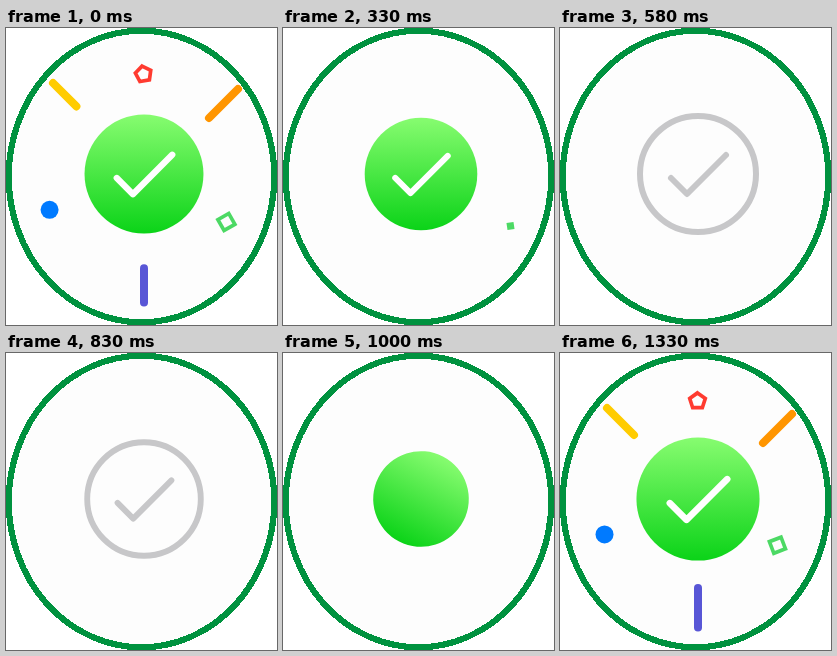
An HTML page that plays this animation: 271 px wide and 297 px high, repeating every 1.37 s.

```html
<!DOCTYPE html>
<html lang="en">
<head>
<meta charset="utf-8">
<title>Check burst</title>
<style>
  html, body { margin: 0; width: 100%; height: 100%; overflow: hidden; background: #fff; }
  svg { display: block; width: 100vw; height: 100vh; }
  .line { fill: none; stroke-linecap: round; stroke-linejoin: round; }
  .ray { stroke-width: 8; }
  .shape { fill: none; stroke-width: 3.7; }
</style>
</head>
<body>
<svg viewBox="0 0 271 297">
  <defs>
    <linearGradient id="fresh" x1="0" y1="0" x2="0" y2="1">
      <stop offset="0" stop-color="#87fc70"/>
      <stop offset="1" stop-color="#0bd318"/>
    </linearGradient>
  </defs>
  <ellipse cx="135.5" cy="148.5" rx="132.8" ry="145.8" fill="#fdfdfd" stroke="#00923f" stroke-width="6.2" shape-rendering="crispEdges"/>

  <g id="burst">
    <line id="yellow" class="line ray" stroke="#ffcc00"/>
    <line id="orange" class="line ray" stroke="#ff9500"/>
    <line id="purple" class="line ray" stroke="#5856d6"/>
    <circle id="dot" fill="#007aff"/>
    <polygon id="pentagon" class="shape" stroke="#ff3b30"/>
    <polygon id="square" class="shape" stroke="#4cd964"/>
  </g>

  <g id="idle" class="line" stroke="#c7c7c9" stroke-width="6">
    <circle r="58"/>
    <path d="M-27 4L-11 20L28-19"/>
  </g>

  <g id="done">
    <circle id="disc" r="59" fill="url(#fresh)"/>
    <path id="tick" class="line" d="M-27 4L-11 20L28-19" stroke="#fff" stroke-width="6.3" pathLength="100"/>
  </g>
</svg>
<script>
  const LOOP = 1370, FPS = 24, STEPS = 33;
  const PRESS = 18;   // step at which the press begins; k counts from it
  const RESET = 29;   // hard cut back to the idle state
  const BURST = 8;    // confetti comes out from behind the disc

  // Tips are where the rays end; "from" and "length" are distances back from the tip.
  const rays = [
    { id: "yellow", tip: [47, 55], back: [1, 1], from: 48, length: 27, enter: 7, leave: 14, power: 2.8 },
    { id: "orange", tip: [232, 61], back: [-1, 1], from: 29, length: 29, enter: 9.3, leave: 15, power: 1 },
    { id: "purple", tip: [138, 274.5], back: [0, -1], from: 70, length: 39.5, enter: 7, leave: 14, power: 1.75 }
  ];

  const $ = id => document.getElementById(id);
  const set = (id, attrs) => {
    for (const name in attrs) $(id).setAttribute(name, attrs[name]);
  };
  const show = (id, on) => set(id, { visibility: on ? "inherit" : "hidden" });

  const progress = (k, k0, k1) => Math.min(1, Math.max(0, (k - k0) / (k1 - k0)));
  // Ease-out between two values; power 1 is linear.
  const tween = (k, k0, k1, from, to, power = 1) =>
    to + (from - to) * (1 - progress(k, k0, k1)) ** power;
  const fly = (k, end, from, to) => tween(k, 6, end, from, to, 3.3);
  const smooth = p => p * p * (3 - 2 * p);

  // Pops past its size, then settles.
  const discRadius = k =>
    tween(k, 3, 10, 0, 67.5, 2.2) - 11.2 * smooth(progress(k, 10, 17.7));

  function drawRay(k, { id, tip, back, from, length, enter, leave, power }) {
    const head = tween(k, enter, 14, from, 0, power);
    const tail = tween(k, enter, 14, from, length, 5) * tween(k, leave, leave + 7.5, 1, 0);
    const [x1, y1] = tip.map((c, i) => c + back[i] * head);
    const [x2, y2] = tip.map((c, i) => c + back[i] * tail);
    set(id, { x1, y1, x2, y2 });
    show(id, tail - head > .5);
  }

  function drawPolygon(id, sides, x, y, size, turn) {
    const points = Array.from({ length: sides }, (_, i) => {
      const angle = (turn + i * 360 / sides) * Math.PI / 180;
      return [x + size * Math.cos(angle), y + size * Math.sin(angle)];
    });
    set(id, { points: points.join(" ") });
    show(id, size > .2);
  }

  function draw(k) {
    const resting = k >= RESET;
    const place = scale => ({ transform: `translate(138 146) scale(${scale})` });

    show("idle", resting || k < 6);
    set("idle", place(resting ? 1 : 1 - .26 * (k / 6) ** 2.3));

    show("done", !resting && k > 3);
    set("done", place(discRadius(k) / 59));
    set("disc", { transform: `rotate(${tween(k, 4, 10, 50, 0, 1.5)})` });
    show("tick", k > 7);
    set("tick", { "stroke-dasharray": `${tween(k, 7, 12, 0, 100, 1.5)} 200` });

    show("burst", !resting && k >= BURST);
    rays.forEach(ray => drawRay(k, ray));
    set("dot", { cx: fly(k, 18, 100, 43), cy: fly(k, 18, 162, 182), r: tween(k, 15, 21, 9, 0) });
    drawPolygon("pentagon", 5, 137.5, fly(k, 18, 161, 45),
      tween(k, 15, 22, 8.2, 0), -90 - 10 * (k - 14));
    drawPolygon("square", 4, fly(k, 24, 157.5, 227.5), fly(k, 24, 158, 198),
      tween(k, 15, 26, 8.8, 0), 24 - 8.6 * (k - 14));
  }

  const start = performance.now();
  function play() {
    const t = (performance.now() - start) % LOOP;
    const step = Math.floor((t + 4) * FPS / 1000);
    draw((step + STEPS - PRESS) % STEPS);
    requestAnimationFrame(play);
  }
  play();
</script>
</body>
</html>
```
